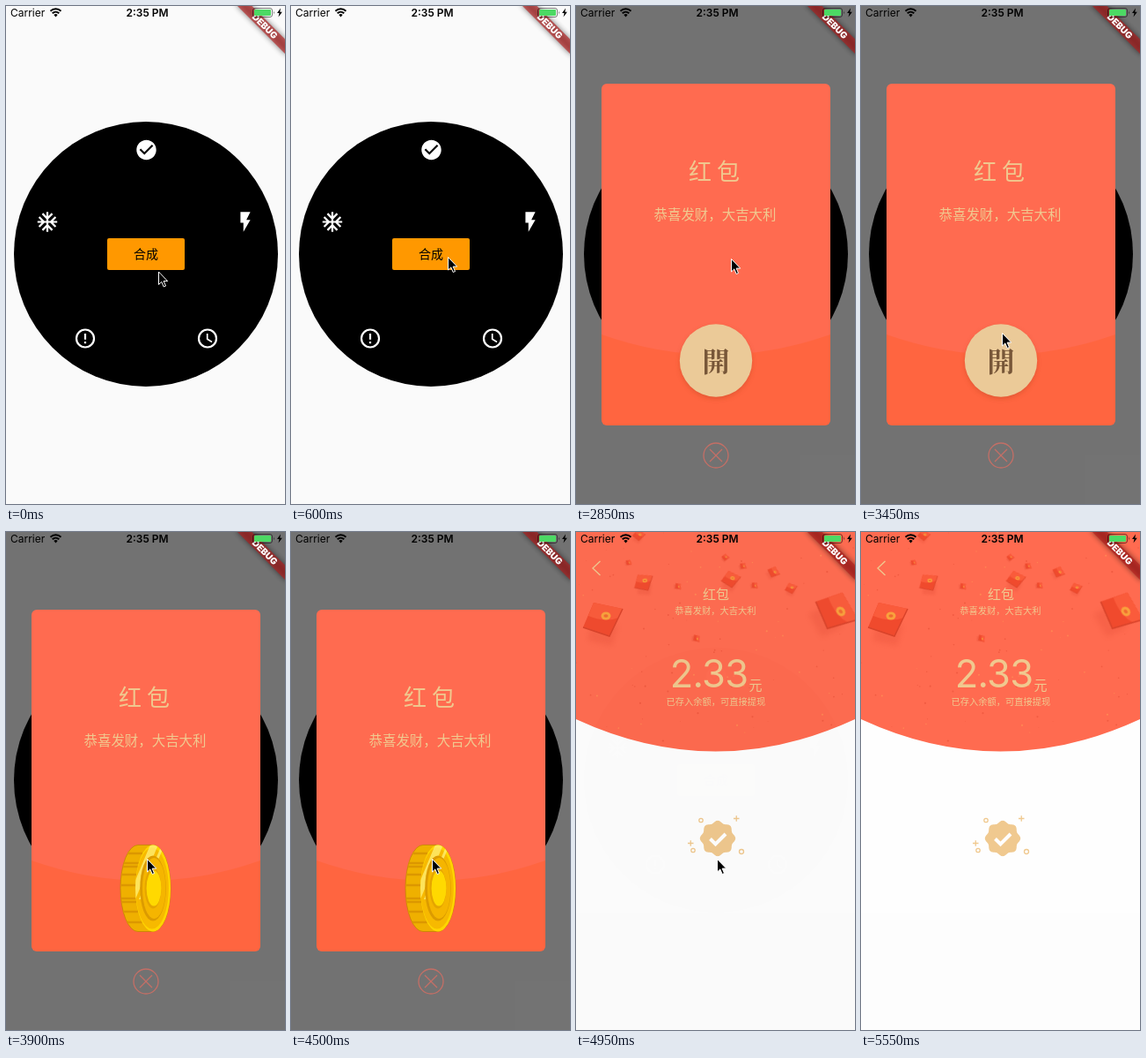
Recreate the animation shown at these times as an HTML page. Size 317x564 px, loop 6.9 s.

```html
<!DOCTYPE html>
<html lang="zh-CN">
<head>
<meta charset="utf-8">
<style>
html, body { margin: 0; width: 100%; height: 100%; overflow: hidden; background: #fafafa }
svg { display: block; font-family: Inter, "Noto Sans CJK SC", sans-serif }
.mid { text-anchor: middle }
.gold { fill: #f0c98f }
.line { fill: none; stroke: #f0c98f; stroke-width: 1.3 }
.icons { fill: #fff }
</style>
</head>
<body>
<svg width="317" height="564" viewBox="0 0 317 564">
<defs>
  <filter id="soft" x="-50%" y="-50%" width="200%" height="200%"><feGaussianBlur stdDeviation="3"/></filter>
  <filter id="haze" x="-50%" y="-50%" width="200%" height="200%"><feGaussianBlur stdDeviation=".5"/></filter>
  <clipPath id="card"><rect x="29" y="88" width="260" height="387" rx="6"/></clipPath>
  <clipPath id="header"><path d="M0 0H317V212Q158.500 285 0 212z"/></clipPath>
  <g id="envelope">
    <path d="M-15 4L15 6 8 30-20 24z" fill="#d8402a" opacity=".2" filter="url(#soft)"/>
    <path d="M-13-19L20-12 5 19-25 9z" fill="#f04a2d"/>
    <path d="M-13-19L20-12 15-2Q1 4-19-4z" fill="#fa5b3b"/>
    <path d="M-25 9L5 19 20-12" fill="none" stroke="#d9432a" stroke-width="1.500"/>
    <ellipse cx="1" cy="-4" rx="5.500" ry="4.500" fill="#f9a13d"/>
    <ellipse cx="1" cy="-4" rx="2.500" ry="1.800" fill="#f06a30"/>
  </g>
</defs>

<g id="home">
  <rect width="317" height="564" fill="#fafafa"/>
  <circle cx="159" cy="281" r="150"/>
  <g class="icons">
    <path transform="translate(159.500 163) scale(1.12) translate(-12 -12)" d="M12 2C6.480 2 2 6.480 2 12s4.480 10 10 10 10-4.480 10-10S17.520 2 12 2zm-2 15l-5-5 1.410-1.410L10 14.170l7.590-7.590L19 8l-9 9z"/>
    <path transform="translate(47 244.500) scale(1.12) translate(-12 -12)" d="M22 11h-4.170l3.240-3.240-1.410-1.420L15 11h-2V9l4.660-4.660-1.420-1.410L13 6.170V2h-2v4.170L7.760 2.930 6.340 4.340 11 9v2H9L4.340 6.340 2.930 7.760 6.170 11H2v2h4.170l-3.240 3.240 1.410 1.420L9 13h2v2l-4.660 4.660 1.420 1.410L11 17.830V22h2v-4.170l3.240 3.240 1.420-1.410L13 15v-2h2l4.660 4.660 1.410-1.420L17.830 13H22z"/>
    <path transform="translate(272 244.500) scale(1.12) translate(-12 -12)" d="M7 2v11h3v9l7-12h-4l4-8z"/>
    <g fill="none" stroke="#fff" stroke-width="2.200">
      <circle cx="90" cy="376.500" r="10"/><path d="M90 371v6.700M90 379.900v2.300"/>
      <circle cx="229" cy="376.500" r="10"/><path d="M228.700 371v6.200l5.300 3.200" stroke-width="1.700"/>
    </g>
  </g>
  <rect x="115" y="263" width="88" height="36" rx="2" fill="#ff9800"/>
  <text class="mid" x="159" y="286" font-size="14">合成</text>
</g>

<rect id="dim" width="317" height="564" fill-opacity=".54"/>

<g id="dialog">
  <g id="lower"><path clip-path="url(#card)" d="M29 360H289V475H29z" fill="#ff6540"/></g>
  <g id="upper">
    <path clip-path="url(#card)" d="M29 88H289V372Q159 418 29 372z" fill="#ff6b50"/>
    <text class="gold" x="128" y="197" font-size="26" font-weight="500" letter-spacing="6">红包</text>
    <text class="gold mid" x="158" y="242" font-size="15.450" font-weight="300">恭喜发财，大吉大利</text>
  </g>
  <g id="open">
    <circle cx="159" cy="404" r="40" fill="#a33818" opacity=".4" filter="url(#soft)"/>
    <circle cx="159" cy="401.500" r="41.200" fill="#ebca98"/>
    <text class="mid" x="159" y="414" font-size="31" font-weight="700" fill="#775638" font-family="'Noto Serif CJK SC','Noto Sans CJK SC',serif">開</text>
  </g>
  <g id="coin"></g>
  <path id="close" d="M152 502l14 14m0-14l-14 14M145 509a14 14 0 0 1 28 0a14 14 0 0 1-28 0" fill="none" stroke="#c46f66" stroke-width="1.300"/>
</g>

<g id="page">
  <rect width="317" height="564" fill="#fefefe"/>
  <rect y="431" width="317" height="133" fill="#fdfdfd"/>
  <g clip-path="url(#header)">
    <rect width="317" height="250" fill="#ff6b50"/>
    <g id="confetti"></g>
  </g>
  <path class="line" d="M27.500 33l-8.500 8 8.500 8"/>
  <g class="gold mid">
    <text x="159" y="76" font-size="15">红包</text>
    <text x="158.500" y="93" font-size="10.250">恭喜发财，大吉大利</text>
    <text x="151" y="176" font-size="43.500" letter-spacing="-.8">2.33</text>
    <text x="204" y="179" font-size="15">元</text>
    <text x="159" y="196" font-size="10.250">已存入余额，可直接提现</text>
  </g>
  <path id="badge" class="gold"/>
  <path d="M152.500 347.500l6 6 11.500-11.500" fill="none" stroke="#fff" stroke-width="4"/>
  <path class="line" d="M179 324.500h6.500m-3.250-3.250v6.500M127 352.500h6.500m-3.250-3.250v6.500"/>
  <g class="line"><circle cx="142" cy="326.500" r="2.200"/><circle cx="133" cy="360.500" r="2.200"/><circle cx="188" cy="362" r="2.500"/></g>
</g>

<g transform="translate(317 0) rotate(45)">
  <rect x="-40" y="26.500" width="80" height="11.700" fill-opacity=".5" filter="url(#soft)"/>
  <rect x="-40" y="26.500" width="80" height="11.700" fill="#b71c1c" fill-opacity=".63"/>
  <text class="mid" y="36" font-size="10.200" font-weight="900" fill="#fff">DEBUG</text>
</g>

<text x="5" y="11.500" font-size="12">Carrier</text>
<path d="M50.500 5.700a8.600 8.600 0 0 1 12 0M52.700 8.200a5.500 5.500 0 0 1 7.600 0" fill="none" stroke="#000" stroke-width="1.900"/>
<path d="M54.300 10a3.200 3.200 0 0 1 4.400 0l-2.200 2.400z"/>
<text class="mid" x="160.500" y="11.500" font-size="12" font-weight="600">2:35 PM</text>
<rect x="280.500" y="2.500" width="22" height="10" rx="2.500" fill="none" stroke="#000" stroke-opacity=".5"/>
<rect x="282" y="4" width="19" height="7" rx="1" fill="#4cd964"/>
<path d="M304 5.800q1.700 1.700 0 3.500z" fill-opacity=".6"/>
<path d="M312 2.500l-4 5.500h2.500l-1 4.500 4.300-5.700h-2.500z"/>

<path id="cursor" d="M.5.500V15l3.300-3.100 2.400 5.600 2.300-1-2.400-5.400h4.600z" stroke="#fff"/>
</svg>

<script>
const LOOP = 6900;
const $ = id => document.getElementById(id);
const show = (id, on) => $(id).style.display = on ? '' : 'none';

// Each row: start time, x, y
const cursorPath = [
  [0, 173, 300.5], [300, 173, 300], [450, 174.5, 291], [600, 178, 284], [2700, 177, 284.5],
  [2850, 176, 286], [3000, 172.5, 289], [3150, 163.5, 333], [3300, 159.5, 370], [3450, 160, 370],
  [5250, 179.5, 400], [5400, 263.5, 558]
];

// Face radius and edge thickness through one spin
const coinPoses = [[48.5, 0], [5, 18], [20, 17], [42, 7]];

function drawCoin([rx, depth]) {
  const left = 158.5 - depth / 2, right = left + depth, cy = 403.5, ry = 49;
  const oval = (k, h, fill, dx = 0) =>
    `<ellipse cx="${right + dx * rx}" cy="${cy}" rx="${rx * k}" ry="${h}" fill="${fill}"/>`;
  let grooves = '';
  for (const y of [364, 375, 379, 388, 400, 415, 419, 430, 442]) {
    const x = left - rx * Math.sqrt(1 - ((y - cy) / ry) ** 2);
    grooves += `M${x} ${y}h${depth}`;
  }
  const shine = (x, w) => {
    const a = right + x * rx;
    return `<path d="M${a} 354l${w * rx} 0l${-1.3 * rx} 62l${-w * rx} 0z" fill="#fff27a" opacity=".75"/>`;
  };
  return `<clipPath id="face">${oval(1, ry, '#000')}</clipPath>
    <path d="M${left} ${cy - ry}H${right}A${rx} ${ry} 0 0 1 ${right} ${cy + ry}H${left}A${rx} ${ry} 0 0 1 ${left} ${cy - ry}z"
      fill="#efb000" stroke="#c58500" stroke-width=".8"/>
    <path d="${grooves}" stroke="#dc9700" stroke-width="2.6"/>
    ${oval(1, ry, '#ffd600')}${oval(.94, 46, '#f7b900', -.05)}
    <g clip-path="url(#face)">${shine(-.15, .45)}${shine(.5, .16)}</g>
    ${oval(.74, 37, '#dc9b00')}${oval(.66, 34.5, '#f5b500', .06)}
    ${oval(.47, 23, '#e5a500')}${oval(.42, 20, '#ffd900', .05)}`;
}

function decorate() {
  let seed = 7, art = '';
  const random = () => (seed = seed * 16807 % 2147483647) / 2147483647;
  for (let i = 0; i < 90; i++) {
    const fill = i % 3 ? '#e85138' : '#ff9a55';
    art += `<circle cx="${random() * 317}" cy="${random() * 240}" r="${.4 + random() * .7}" fill="${fill}" opacity=".6"/>`;
  }
  // x, y, scale, rotation
  const envelopes = [
    [33, 99, 1, 0], [297, 92, 1.05, 48], [78, 57, .5, -8], [177, 54, .46, 14],
    [225, 46, .3, 45], [245, 64, .3, 8], [137, 121, .2, 80], [170, 29, .18, 30],
    [190, 39, .18, 60], [116, 62, .18, 75], [203, 61, .18, 70], [72, 4, .3, 20], [60, 35, .16, 60]
  ];
  for (const [x, y, scale, turn] of envelopes)
    art += `<use href="#envelope" filter="url(#haze)" transform="translate(${x} ${y}) rotate(${turn}) scale(${scale})"/>`;
  $('confetti').innerHTML = art;

  let outline = '';
  for (let i = 0; i < 160; i++) {
    const a = i * Math.PI / 80, r = 18.9 + 1.3 * Math.cos(a * 8);
    outline += `${i ? 'L' : 'M'}${161 + r * Math.sin(a)} ${347 - r * Math.cos(a)}`;
  }
  $('badge').setAttribute('d', outline + 'z');
}

let lastPose = -1;
function render(t) {
  show('dim', t >= 2850);
  show('dialog', t >= 2850 && t < 4950);
  show('open', t < 3600);
  show('coin', t >= 3600 && t < 4650);
  show('close', t < 4650);
  show('lower', t < 4800);
  $('lower').setAttribute('transform', `translate(0 ${t < 4650 ? 0 : 95})`);
  $('upper').setAttribute('transform',
    t < 4650 ? '' :
    t < 4800 ? 'translate(0 -43)' :
    'translate(158.5 198) scale(1.22) translate(-159 -395)');

  const pose = Math.floor(Math.max(0, t - 3600) / 150) % coinPoses.length;
  if (pose !== lastPose) $('coin').innerHTML = drawCoin(coinPoses[lastPose = pose]);

  show('page', t >= 4950);
  $('page').style.opacity = t < 5100 ? .985 : 1;

  const [, x, y] = cursorPath.filter(step => step[0] <= t).pop();
  $('cursor').setAttribute('transform', `translate(${x} ${y})`);
  show('cursor', t < 5550);
}

decorate();
const start = performance.now();
function tick() {
  render((performance.now() - start) % LOOP);
  requestAnimationFrame(tick);
}
tick();
</script>
</body>
</html>
```
